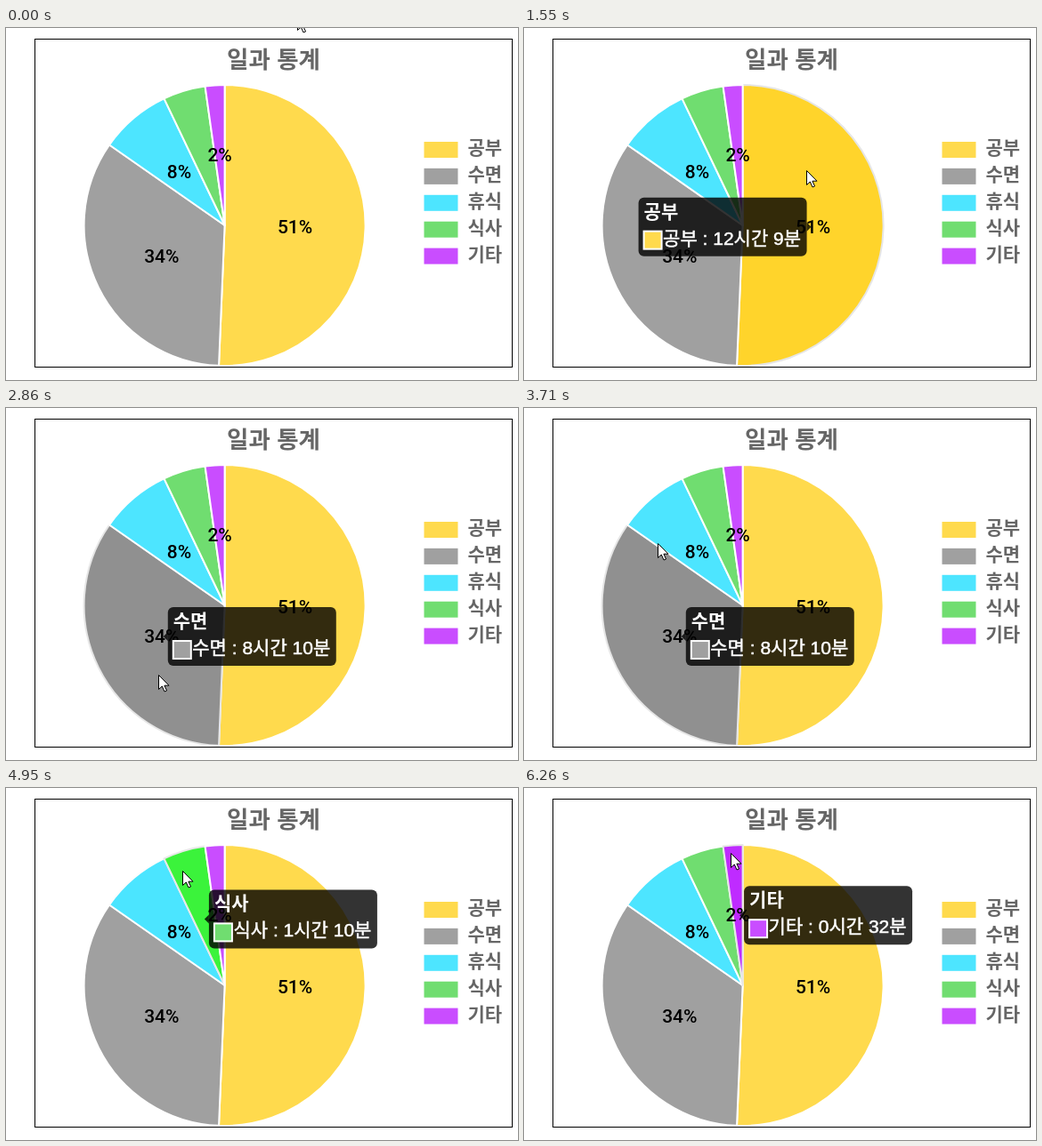
An HTML page that plays this animation: 575 px wide and 396 px high, repeating every 6.64 s.

```html
<!DOCTYPE html>
<html lang="ko">
<head>
<meta charset="utf-8">
<title>일과 통계</title>
<style>
  html, body { margin: 0; width: 100%; height: 100%; overflow: hidden; background: #fff; }
  svg { display: block; width: 575px; height: 396px; }
  text { font-family: "Liberation Sans", "Noto Sans CJK KR", sans-serif; white-space: pre; }
  .bold { font-weight: 700; }
  .gray { fill: #666; }
  #labels text { font: 500 21px Roboto, sans-serif; text-anchor: middle; }
  #content text { font-size: 21px; fill: #fff; }
</style>
</head>
<body>
<svg viewBox="0 0 575 396" xmlns="http://www.w3.org/2000/svg">
  <rect x="32.5" y="12.5" width="536" height="369" fill="#fff" stroke="#000"/>
  <text class="bold gray" x="300.5" y="45" font-size="26.5" text-anchor="middle">일과 통계</text>
  <g id="legend"></g>
  <g id="pie" stroke-width="2" stroke-linejoin="round"></g>
  <g id="labels"></g>
  <g id="tip">
    <g fill-opacity=".8">
      <rect width="189" height="66" rx="6"/>
      <path id="caret"/>
    </g>
    <g id="content">
      <text id="head" class="bold" x="6" y="23"></text>
      <rect id="swatch" x="6" y="38" width="20" height="20" stroke="#fff" stroke-width="2"/>
      <text id="body" x="27.5" y="53" stroke="#fff" stroke-width=".5"></text>
    </g>
  </g>
  <path id="cursor" d="M-.5 .5V16.5L3.3 13L6 19L8.5 18L5.9 12.2H11Z" fill="#fff" stroke="#000"/>
</svg>
<script>
const LOOP = 6640, TICK = 78, LAG = 50;
const CX = 245.6, CY = 222, R = 158;
const TIP_W = 189, TIP_H = 66, GAP = 7;
const WHITE = [255, 255, 255], EDGE = [230, 230, 230];

const slices = [
  { name: '공부', min: 729, color: [255, 218, 77], hover: [255, 212, 43], label: '51%' },
  { name: '수면', min: 490, color: [160, 160, 160], hover: [144, 144, 144], label: '34%' },
  { name: '휴식', min: 118, color: [77, 229, 255], hover: [43, 223, 255], label: '8%' },
  { name: '식사', min: 70, color: [112, 221, 112], hover: [55, 245, 55] },
  { name: '기타', min: 32, color: [201, 77, 255], hover: [191, 43, 255], label: '2%' }
];

// Pointer trips: start time, ticks per leg, stops
const trips = [
  { at: 290, leg: 4, stops: [[328, -14], [420, 60], [413, 126], [345, 138], [318, 160]] },
  { at: 1930, leg: 3.5, stops: [[318, 160], [312, 217], [239, 311], [172, 300]] },
  { at: 3410, leg: 4, stops: [[172, 300], [151, 152], [153, 132]] },
  { at: 4410, leg: 5, stops: [[153, 132], [199, 93]] },
  { at: 5410, leg: 5, stops: [[199, 93], [233, 73]] }
];

const hits = [];
const $ = id => document.getElementById(id);
const outQuart = u => 1 - Math.pow(1 - Math.min(1, u), 4);
const mix = (a, b, u) => a + (b - a) * u;
const blend = (a, b, u) => `rgb(${a.map((v, i) => Math.round(mix(v, b[i], u)))})`;
const polar = (angle, r) => [CX + r * Math.sin(angle), CY - r * Math.cos(angle)];

function add(parent, tag, attrs, text) {
  const el = document.createElementNS('http://www.w3.org/2000/svg', tag);
  for (const k in attrs) el.setAttribute(k, attrs[k]);
  if (text) el.textContent = text;
  return parent.appendChild(el);
}

function build() {
  const total = slices.reduce((sum, s) => sum + s.min, 0);
  let from = 0;
  slices.forEach((s, i) => {
    s.end = from + s.min / total * 2 * Math.PI;
    const big = s.end - from > Math.PI ? 1 : 0;
    s.el = add($('pie'), 'path', {
      d: `M${CX} ${CY}L${polar(from, R)}A${R} ${R} 0 ${big} 1 ${polar(s.end, R)}Z`
    });
    const [x, y] = polar((from + s.end) / 2, R / 2);
    s.right = x > CX;
    s.x = s.right ? x - GAP - TIP_W : x + GAP;
    s.y = y - TIP_H / 2;
    s.body = `${s.name} : ${Math.floor(s.min / 60)}시간 ${s.min % 60}분`;
    if (s.label) add($('labels'), 'text', { x, y: y + 7 }, s.label);
    const row = 29.9 * i;
    add($('legend'), 'rect', {
      x: 469.5, y: 128 + row, width: 38, height: 18, fill: blend(s.color, s.color, 0)
    });
    add($('legend'), 'text', {
      class: 'bold gray', x: 518.5, y: 142.3 + row, 'font-size': 21
    }, s.name);
    from = s.end;
  });
}

const tripAt = t => trips.filter(p => p.at <= t).pop() || trips[0];

function pointer(t) {
  const { at, leg, stops } = tripAt(t);
  const last = stops.length - 1;
  const u = Math.min(last, Math.max(0, (t - at) / (leg * TICK)));
  const i = Math.min(last - 1, Math.floor(u));
  return stops[i].map((v, k) => mix(v, stops[i + 1][k], u - i));
}

function sliceAt([x, y]) {
  if (Math.hypot(x - CX, y - CY) > R) return -1;
  const angle = (Math.atan2(x - CX, CY - y) + 2 * Math.PI) % (2 * Math.PI);
  return slices.findIndex(s => angle < s.end);
}

// Find when the pointer enters each slice
function findHits() {
  let now = -1;
  for (let t = 0; t < LOOP; t += 2) {
    const i = sliceAt(pointer(t - LAG));
    if (i >= 0 && i !== now) hits.push({ t, slice: slices[now = i] });
  }
}

// The screen refreshes once per tick, counted from each trip's start
function held(t) {
  const { at } = tripAt(t);
  return t < at ? 0 : at + TICK * Math.floor((t - at + 15) / TICK);
}

function drawTip(s, old, u, fade) {
  const x = mix(old ? old.x : s.x - 3, s.x, u);
  const y = mix(old ? old.y : s.y - 18, s.y, u);
  $('tip').setAttribute('transform', `translate(${x} ${y})`);
  $('tip').setAttribute('opacity', fade);
  $('content').setAttribute('opacity', fade);
  $('caret').setAttribute('d', s.right ? `M${TIP_W} 28l5 5l-5 5Z` : 'M0 28l-5 5l5 5Z');
  $('head').textContent = s.name;
  $('body').textContent = s.body;
  $('swatch').setAttribute('fill', blend(s.color, s.color, 0));
}

function draw(time) {
  const t = held(time % LOOP);
  const past = hits.filter(h => h.t <= t);
  const hit = past.pop(), prev = past.pop();
  const active = hit && hit.slice, old = prev && prev.slice;
  const u = hit ? outQuart((t - hit.t) / 400) : 0;
  for (const s of slices) {
    const glow = s === active ? u : s === old ? 1 - u : 0;
    s.el.setAttribute('fill', blend(s.color, s.hover, glow));
    s.el.setAttribute('stroke', blend(WHITE, EDGE, glow));
  }
  $('tip').style.display = active ? '' : 'none';
  if (active) drawTip(active, old, u, old ? 1 : Math.min(1, (t - hit.t) / 190));
  $('cursor').setAttribute('transform', `translate(${pointer(t).map(Math.round)})`);
}

build();
findHits();
const begin = performance.now();
(function loop() {
  draw(performance.now() - begin);
  requestAnimationFrame(loop);
})();
</script>
</body>
</html>
```
